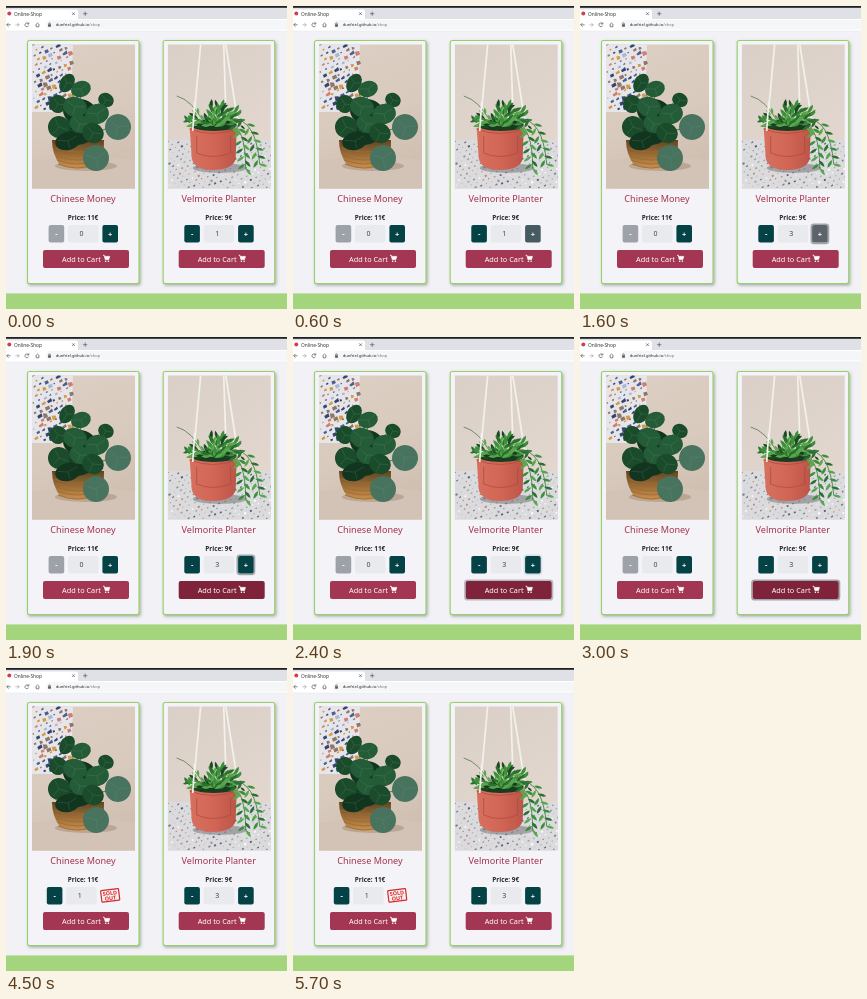
An HTML page for the animation above (5800 ms loop, 281 px wide and 303 px high).

```html
<!DOCTYPE html>
<html lang="en">
<head>
<meta charset="utf-8">
<title>Online-Shop</title>
<style>
html, body { margin: 0; width: 100%; height: 100%; overflow: hidden; background: #f2f2f6; }
svg { display: block; width: 100%; height: 100%; }
text { font-family: "Noto Sans", "Open Sans", sans-serif; }
.mid { text-anchor: middle; }
.title { font-size: 9.1px; font-weight: 500; fill: #a5304e; }
.price { font-size: 6.4px; font-weight: 700; fill: #24272b; }
.label { font-size: 7.3px; fill: #fff; }
.qty { font-size: 7px; fill: #3c4248; }
.sign { font-size: 7.5px; font-weight: 700; fill: #fff; }
.stamp text { font-size: 5.4px; font-weight: 700; fill: #d3292c; }
</style>
</head>
<body>
<svg viewBox="0 0 281 303" preserveAspectRatio="none">
  <defs>
    <linearGradient id="wallA" x2="0.3" y2="1">
      <stop offset="0" stop-color="#dccfc3"/><stop offset=".6" stop-color="#d8cabd"/><stop offset="1" stop-color="#cfbfb1"/>
    </linearGradient>
    <linearGradient id="wallB" x2="0.4" y2="1">
      <stop offset="0" stop-color="#dad0c8"/><stop offset="1" stop-color="#e3d7ce"/>
    </linearGradient>
    <linearGradient id="clay">
      <stop offset="0" stop-color="#d6705f"/><stop offset=".5" stop-color="#d26656"/><stop offset="1" stop-color="#bd5548"/>
    </linearGradient>
    <linearGradient id="basket" x2="0" y2="1">
      <stop offset="0" stop-color="#63431f"/><stop offset="1" stop-color="#cb9250"/>
    </linearGradient>
    <filter id="soft" x="-10%" y="-10%" width="125%" height="125%">
      <feDropShadow dx="1.2" dy="1.5" stdDeviation="1.4" flood-color="#566650" flood-opacity=".5"/>
    </filter>
    <clipPath id="frame"><rect x="26" y="38.5" width="103" height="144"/></clipPath>
  </defs>
  <rect width="281" height="303" fill="#f2f2f6"/>
  <g id="browser">
    <rect width="281" height="13" fill="#dfe1e6"/>
    <rect width="281" height="1.8" fill="#202124"/>
    <path d="M0 13V3.5H70q2 0 2 2V13z" fill="#fff"/>
    <rect y="13" width="281" height="12" fill="#fff"/>
    <rect x="40" y="14" width="250" height="9.6" rx="4.8" fill="#f5f6f7"/>
    <path d="M0 25H281" stroke="#e3e4e8" stroke-width=".5"/>
    <circle cx="3.3" cy="7.6" r="2" fill="#d43f50"/>
    <text x="8" y="9.5" font-size="4.8" fill="#333">Online-Shop</text>
    <g fill="none" stroke="#55585d" stroke-width=".7">
      <path d="M66.2 6.4l2.6 2.6m0-2.6l-2.6 2.6M79.2 5.6v4.2m-2.1-2.1h4.2"/>
      <path d="M.8 18.8H4.6M2.6 16.9l-1.9 1.9 1.9 1.9"/>
      <path d="M9.4 18.8h3.8M11.3 16.9l1.9 1.9-1.9 1.9" opacity=".5"/>
      <path d="M22.4 17.7a1.9 1.9 0 1 0 .2 1.9M22.8 16.3v1.7h-1.8"/>
      <path d="M29.5 18.9l2-1.9 2 1.9M30.2 18.5v2.3h2.6v-2.3"/>
      <path d="M42.7 18.4v-.8a.8.8 0 0 1 1.6 0v.8"/>
    </g>
    <rect x="42.1" y="18.3" width="2.8" height="2.4" fill="#55585d"/>
    <text x="49.7" y="20.4" font-size="4.1" fill="#222">dunfriel.github.io<tspan fill="#777">/shop</tspan></text>
  </g>
  <g id="shop"></g>
  <rect y="287.4" width="281" height="16" fill="#a4d57c"/>
</svg>
<script>
const NS = "http://www.w3.org/2000/svg";
const LOOP = 5800, STEP = 100, FADE = 150;
const TEAL = [4, 66, 70], HOVER = [92, 99, 106], PALE = [157, 162, 169];
const WINE = [163, 54, 82], DARK = [126, 35, 58];
const LEAF = ["#12351f", "#1a4b2b", "#235c37", "#47735f"];
const FROND = ["#1b4a22", "#2b7031", "#3c8f3b", "#57a84a"];

function add(parent, tag, attrs = {}, text) {
  const e = document.createElementNS(NS, tag);
  for (const k in attrs) e.setAttribute(k, attrs[k]);
  if (text !== undefined) e.textContent = text;
  parent.appendChild(e);
  return e;
}
function seeded(s) {
  return () => (s = (s * 16807) % 2147483647) / 2147483647;
}
const rect = (g, x, y, width, height, more) => add(g, "rect", { x, y, width, height, ...more });
const path = (g, d, more) => add(g, "path", { d, ...more });

// Chips spread evenly by the golden ratio, with random shapes.
function chips(g, n, x, y, w, h, size, colors, rnd) {
  for (let i = 0; i < n; i++) {
    const cx = x + (i * .618034 % 1) * w, cy = y + (i + rnd()) / n * h, s = size * (.4 + rnd());
    path(g, `M${cx} ${cy}l${s} ${-s * rnd()} ${s * .3} ${s * .8} ${-s} ${s * .5}z`,
      { fill: colors[Math.floor(rnd() * colors.length)] });
  }
}

function roundLeaf(g, cx, cy, rx, ry, turn, tone) {
  const leaf = add(g, "g", { transform: `translate(${cx} ${cy}) rotate(${turn})` });
  add(leaf, "ellipse", { rx, ry, fill: LEAF[tone] });
  path(leaf, `M0 0L${-rx * .75} ${-ry * .35}M0 0L${rx * .75} ${-ry * .3}M0 0L0 ${ry * .8}`,
    { stroke: "#6f9d86", "stroke-width": .5, opacity: .4 });
}

function potted(g) {
  rect(g, 26, 38, 104, 145, { fill: "url(#wallA)" });
  path(g, "M26 38H67L65 106H26z", { fill: "#e6e5ea" });
  chips(g, 85, 26, 39, 38, 65, 3, ["#d79a45", "#4d5f8f", "#cf7f70", "#a9b8d0", "#8f7667", "#34456f"], seeded(41));
  path(g, "M26 155Q70 147 129 154V183H26z", { fill: "#d2c3b6" });
  add(g, "ellipse", { cx: 80, cy: 160, rx: 31, ry: 5, fill: "#a8937f", opacity: .6 });
  path(g, "M46 134H98Q99 150 90 160Q72 166 54 159Q46 148 46 134z", { fill: "url(#basket)" });
  for (let i = 0; i < 5; i++)
    path(g, `M${48 + i} ${142 + i * 4}Q72 ${150 + i * 4} ${97 - i * 2} ${142 + i * 4}`,
      { fill: "none", stroke: "#a0692f", "stroke-width": .8 });
  const leaves = [
    [70, 126, 18, 13, 0, 0], [74, 106, 17, 13, 10, 0], [61, 77, 7, 10, 30, 1],
    [75, 83, 10, 8, -20, 2], [52, 98, 9, 9, 30, 1], [69, 101, 12, 10, 15, 2],
    [100, 94, 8, 7, 30, 1], [91, 108, 12, 10, -15, 2], [53, 121, 11, 11, 40, 1],
    [62, 135, 13, 9, -15, 0], [74, 118, 11, 9, 20, 2], [87, 127, 11, 10, 25, 1],
    [112, 121, 13, 13, 15, 3], [90, 152, 13, 13, -10, 3]
  ];
  for (const [x, y] of leaves)
    path(g, `M74 138Q${(x + 74) / 2} ${y} ${x} ${y}`, { fill: "none", stroke: "#4b7040", "stroke-width": .9 });
  for (const l of leaves) roundLeaf(g, ...l);
}

function blade(g, x, y, len, turn, tone) {
  path(g, `M0 0Q${len * .5} ${-len * .34} ${len} 0Q${len * .5} ${len * .3} 0 0z`,
    { fill: FROND[tone], transform: `translate(${x} ${y}) rotate(${turn})` });
}

// Drawn in the left card's coordinates, then moved with the card.
function hanging(g) {
  const rnd = seeded(93);
  rect(g, 26, 38, 104, 145, { fill: "url(#wallB)" });
  rect(g, 26, 134, 104, 49, { fill: "#dbdbde" });
  chips(g, 190, 26, 135, 103, 47, 1.5, ["#8e949b", "#59606f", "#a9a6a8", "#747d8c", "#b98e7c", "#fff"], rnd);
  add(g, "ellipse", { cx: 78, cy: 162, rx: 27, ry: 5, fill: "#77767b", opacity: .55 });
  path(g, "M59 38L51 125M82 38L84 100M84 38L97 121", { fill: "none", stroke: "#f3f1ec", "stroke-width": 1.7 });
  path(g, "M48 122Q71 113 95 122L94 152Q92 164 71 164Q52 164 50 152z", { fill: "url(#clay)" });
  path(g, "M48 123Q71 132 95 123M55 130V147Q71 154 89 147V130", { fill: "none", stroke: "#a94a3e", "stroke-width": .7 });
  add(g, "ellipse", { cx: 72, cy: 119, rx: 23, ry: 6, fill: "#173c20" });
  path(g, "M62 116Q50 94 35 90", { fill: "none", stroke: "#567a4c", "stroke-width": .8 });
  for (let i = 0; i < 85; i++) {
    const a = Math.PI * (1 + rnd()), r = rnd();
    blade(g, 73 + Math.cos(a) * 27 * r, 121 + Math.sin(a) * 20 * r,
      6 + rnd() * 6, a * 180 / Math.PI + (rnd() - .5) * 100, Math.floor(rnd() * 4));
  }
  path(g, "M88 116Q104 122 104 162M90 113Q114 112 118 158", { fill: "none", stroke: "#43804a", "stroke-width": .9 });
  for (let i = 0; i < 12; i++) {
    const k = i / 11;
    blade(g, 94 + 10 * Math.sqrt(k), 119 + 43 * k, 9, i % 2 ? 25 + 30 * k : 145, 1 + i % 3);
    blade(g, 100 + 17 * Math.sqrt(k), 114 + 44 * k, 9, i % 2 ? 15 : 120, 1 + i % 3);
  }
  path(g, "M51 125L53 96", { stroke: "#f3f1ec", "stroke-width": 1.7 });
}

function button(g, x, y, w, h) {
  const b = add(g, "g");
  const ring = rect(b, x - .8, y - .8, w + 1.6, h + 1.6,
    { rx: 2.6, fill: "none", stroke: "#858c93", "stroke-width": 1.6, opacity: 0 });
  const face = rect(b, x, y, w, h, { rx: 2 });
  return {
    g: b,
    paint(color, glow = 0) {
      face.setAttribute("fill", `rgb(${color.map(Math.round)})`);
      ring.setAttribute("opacity", glow * .75);
    }
  };
}

function card(dx, name, price, photo) {
  const g = add(document.getElementById("shop"), "g", { transform: `translate(${dx})` });
  rect(g, 21.5, 34.5, 111.5, 243, { rx: 2, fill: "#f4f4f8", stroke: "#97cf6b", "stroke-width": 1.1, filter: "url(#soft)" });
  photo(add(g, "g", { "clip-path": "url(#frame)" }));
  add(g, "text", { x: 77, y: 195.5, class: "title mid" }, name);
  add(g, "text", { x: 77, y: 213.6, class: "price mid" }, `Price: ${price}€`);

  const row = add(g, "g");
  const minus = button(row, 42.6, 219, 15.6, 17.6);
  add(minus.g, "text", { x: 50.4, y: 230.4, class: "sign mid" }, "-");
  rect(row, 62, 219, 30.5, 17.6, { rx: 2, fill: "#e8eaee" });
  const qty = add(row, "text", { x: 75.5, y: 230.3, class: "qty mid" });
  const plus = button(row, 96.4, 219, 15.6, 17.6);
  add(plus.g, "text", { x: 104.2, y: 230.6, class: "sign mid" }, "+");

  const cart = button(g, 37, 244, 86, 18);
  add(cart.g, "text", { x: 56, y: 255.7, class: "label" }, "Add to Cart");
  path(cart.g, "M97 249.2h1.2l1 4.4h3.6l.9-3.2h-5.2", { fill: "#fff", stroke: "#fff", "stroke-width": .7 });
  add(cart.g, "circle", { cx: 99.7, cy: 255.3, r: .8, fill: "#fff" });
  add(cart.g, "circle", { cx: 102.4, cy: 255.3, r: .8, fill: "#fff" });
  return { row, minus, qty, plus, cart };
}

const left = card(0, "Chinese Money", 11, potted);
const right = card(135.7, "Velmorite Planter", 9, hanging);

const stamp = add(left.row, "g", { class: "stamp", transform: "translate(106 227.4) rotate(-7)" });
rect(stamp, -9, -5.8, 18, 11.6, { rx: .8, fill: "#fbeeee", stroke: "#d3292c", "stroke-width": 1.2 });
add(stamp, "text", { y: -.4, class: "mid" }, "SOLD");
add(stamp, "text", { y: 4.6, class: "mid" }, "OUT");

// Eased 0..1 level that is on between two times.
function level(t, from, to = LOOP) {
  const ease = x => { x = Math.min(1, Math.max(0, x)); return x * x * (3 - 2 * x); };
  return ease((t - from) / FADE) * (1 - ease((t - to) / FADE));
}
const mix = (a, b, k) => a.map((v, i) => v + (b[i] - v) * k);

function draw(time) {
  const t = Math.floor((time % LOOP) / STEP) * STEP;
  const sold = t >= 3900;

  right.minus.paint(TEAL);
  right.plus.paint(mix(TEAL, HOVER, level(t, 500, 1700)), level(t, 800, 2300));
  right.qty.textContent = t < 900 ? 1 : t < 1400 ? 2 : 3;
  right.cart.paint(mix(WINE, DARK, level(t, 1700, 3300)), level(t, 2300, 3600));

  left.minus.paint(mix(PALE, TEAL, level(t, 3900)));
  left.plus.paint(mix(TEAL, HOVER, level(t, 3500)), level(t, 3600));
  left.plus.g.style.display = sold ? "none" : "";
  stamp.style.display = sold ? "" : "none";
  left.qty.textContent = sold ? 1 : 0;
  left.row.setAttribute("transform", `translate(${sold ? -1.8 : 0})`);
  left.cart.paint(WINE);
}

const start = performance.now();
function tick() {
  draw(performance.now() - start);
  requestAnimationFrame(tick);
}
tick();
</script>
</body>
</html>
```
